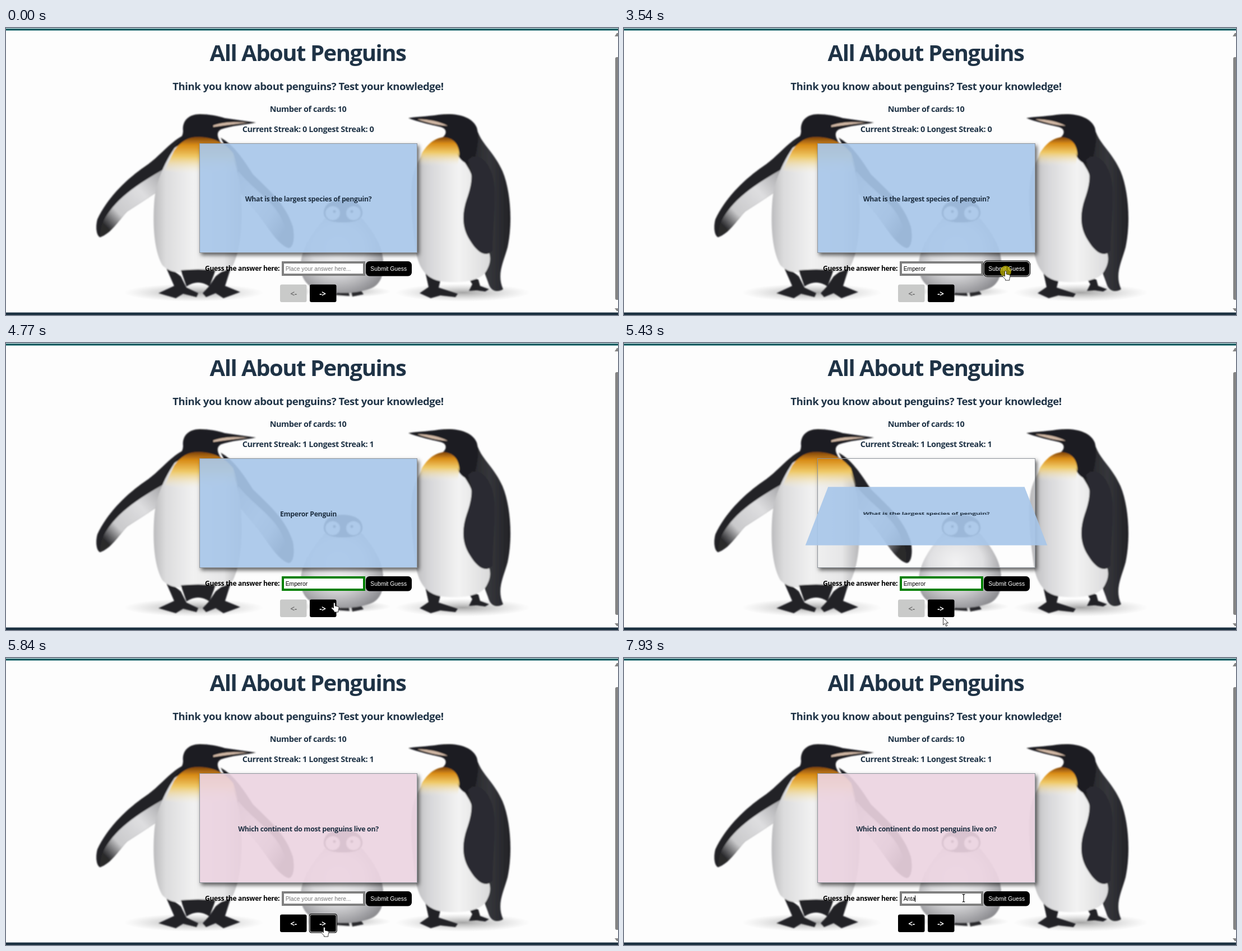
An HTML page for the animation above (8 s loop, 1092 by 513 pixels).

```html
<!DOCTYPE html>
<html lang="en">
<head>
<meta charset="utf-8">
<title>All About Penguins</title>
<style>
  html, body { margin: 0; width: 100%; height: 100%; overflow: hidden; background: #fdfdfd; }
  body { position: relative; }
  svg { position: absolute; left: 0; top: 0; width: 1092px; height: 513px; display: block; }
  .bold, .face {
    font-family: 'Open Sans', 'Noto Sans', sans-serif;
    font-weight: 700;
    letter-spacing: -0.025em;
    fill: #1f3346;
    color: #1f3042;
  }
  .title { letter-spacing: -0.037em; }
  .mid { text-anchor: middle; }
  .ctl { font: 10.3px 'Liberation Sans', Arial, sans-serif; }

  .card {
    position: absolute; left: 345px; top: 206px; width: 387px; height: 194px;
    border: 1px solid #8f959c;
    box-shadow: 3px 4px 7px rgba(0, 0, 0, .62);
    perspective: 790px;
  }
  .flip {
    position: absolute; inset: 0;
    transform-style: preserve-3d;
    animation: flip 8s infinite;
  }
  .face {
    position: absolute; inset: 0; padding-top: 2px; box-sizing: border-box;
    display: flex; align-items: center; justify-content: center;
    font-size: 12.3px; white-space: nowrap;
    background: rgba(168, 198, 233, .91);
    backface-visibility: hidden;
  }
  .back { transform: rotateX(180deg); }
  .pink .face { background: rgba(236, 211, 225, .91); }
  @keyframes flip {
    0%, 52.375% { transform: rotateX(0deg); animation-timing-function: ease; }
    57.375%, 65.9% { transform: rotateX(180deg); animation-timing-function: ease; }
    70.9%, 100% { transform: rotateX(0deg); }
  }
</style>
</head>
<body>

<svg viewBox="0 0 1092 513">
  <defs>
    <linearGradient id="belly">
      <stop offset="0" stop-color="#bcbcbe"/><stop offset=".14" stop-color="#dcdcdd"/>
      <stop offset=".45" stop-color="#f1f1f1"/><stop offset=".8" stop-color="#e6e6e7"/>
      <stop offset="1" stop-color="#b6b6b8"/>
    </linearGradient>
    <linearGradient id="bellySide">
      <stop offset="0" stop-color="#b8b8ba"/><stop offset=".25" stop-color="#d8d8da"/>
      <stop offset=".6" stop-color="#f3f3f3"/><stop offset="1" stop-color="#dadadb"/>
    </linearGradient>
    <linearGradient id="gold" x2="0" y2="1">
      <stop offset="0" stop-color="#7c420c"/><stop offset=".2" stop-color="#d98c18"/>
      <stop offset=".48" stop-color="#efc967"/><stop offset=".9" stop-color="#f6efdc" stop-opacity="0"/>
    </linearGradient>
    <linearGradient id="wingL" x1="1" y1="0" x2="0" y2="1">
      <stop offset="0" stop-color="#a2a2a5"/><stop offset=".35" stop-color="#dedee0"/>
      <stop offset=".68" stop-color="#c9c9cb"/><stop offset=".88" stop-color="#29292c"/>
    </linearGradient>
    <linearGradient id="wingR" x2="1" y2="1">
      <stop offset="0" stop-color="#8b8b8f"/><stop offset=".4" stop-color="#cfcfd1"/>
      <stop offset=".62" stop-color="#a8a8ab"/><stop offset=".85" stop-color="#29292c"/>
    </linearGradient>
    <linearGradient id="coat">
      <stop offset="0" stop-color="#1c1c1f"/><stop offset=".6" stop-color="#35363b"/>
      <stop offset="1" stop-color="#222226"/>
    </linearGradient>
    <radialGradient id="chick" cx=".45" cy=".4" r=".65">
      <stop offset="0" stop-color="#f3f3f4"/><stop offset=".5" stop-color="#e0e0e2"/>
      <stop offset="1" stop-color="#8f8f93"/>
    </radialGradient>
    <radialGradient id="ground">
      <stop offset="0" stop-color="#777" stop-opacity=".65"/><stop offset="1" stop-color="#aaa" stop-opacity="0"/>
    </radialGradient>
    <filter id="soft"><feGaussianBlur stdDeviation=".8"/></filter>
  </defs>

  <g fill="url(#ground)">
    <ellipse cx="335" cy="473" rx="125" ry="16"/>
    <ellipse cx="602" cy="471" rx="85" ry="11"/>
    <ellipse cx="815" cy="473" rx="120" ry="16"/>
  </g>

  <g filter="url(#soft)">
    <!-- left adult -->
    <path fill="#242428" d="M316 192C290 206 276 228 250 246C215 270 182 302 163 342C159 358 162 372 168 374C188 367 200 345 216 328L268 294L300 230Z"/>
    <path fill="url(#wingL)" d="M282 252C250 270 216 292 196 314C178 334 168 350 168 373C188 366 200 345 216 328L268 294Z"/>
    <path fill="#242428" d="M383 196C408 210 424 236 441 262C470 290 500 316 512 356C516 378 512 395 503 393C482 385 466 352 446 328L416 292L400 230Z"/>
    <path fill="url(#wingR)" d="M414 256C440 288 474 308 490 338C502 362 506 378 503 392C482 384 466 352 446 328L416 292Z"/>
    <path fill="#242428" d="M282 420L312 444L322 464L343 474L340 481L316 475L303 483L272 474L300 461ZM404 420L374 444L362 462L351 474L357 481L374 474L388 483L418 472L391 461Z"/>
    <path fill="url(#belly)" d="M308 204C292 226 270 262 265 305C261 350 264 398 279 424C294 440 320 440 343 432C364 440 390 440 405 424C419 396 423 345 419 296C416 256 404 222 382 202Z"/>
    <path fill="#242428" d="M312 433Q343 430 374 433L363 462Q343 448 322 462Z"/>
    <path fill="#1d1d20" d="M316 184C314 166 326 154 346 154C362 154 378 157 390 161L446 169C426 173 400 175 384 181C374 186 377 197 386 208C362 198 328 193 297 217C306 204 316 196 316 184Z"/>
    <path fill="url(#gold)" d="M300 219C314 199 330 193 350 195C372 197 390 205 405 224L414 254L352 268L284 254Z"/>
    <path fill="#d3b9a6" d="M370 174C390 167 412 168 432 169C410 171 390 174 370 177Z"/>

    <!-- right adult -->
    <path fill="#242428" d="M748 436L775 452L772 464L806 475L802 481L775 478L758 483L738 474L754 463ZM820 438L843 450L846 461L862 467L855 471L840 469L826 470L832 458Z"/>
    <path fill="url(#coat)" d="M806 190L842 186C850 208 872 224 886 256C901 292 904 350 895 392C888 418 875 440 887 467C875 474 864 470 860 454L840 400L815 300Z"/>
    <path fill="url(#bellySide)" d="M778 198C752 210 734 232 726 264C719 302 725 350 731 396C736 432 752 449 778 453C812 457 846 452 856 436C868 416 864 404 858 392C836 360 822 320 832 268C828 250 816 240 808 222Z"/>
    <path fill="#1d1d20" d="M718 161C736 158 756 158 772 155C804 151 832 158 840 178C844 192 843 208 835 240C824 246 812 240 806 226C802 212 794 204 776 198C788 190 787 180 776 177C758 173 736 168 718 161Z"/>
    <path fill="url(#gold)" d="M742 224C752 207 766 196 782 195C800 197 808 209 809 226L806 246L768 252L734 246Z"/>
    <path fill="#d3b9a6" d="M734 163C752 163 774 167 788 175C768 173 750 169 734 163Z"/>
    <path fill="#2b2c31" d="M832 230C856 226 872 256 872 296C872 330 868 372 868 398C856 412 840 400 828 380C812 356 814 330 822 306C832 278 834 258 824 236Z"/>

    <!-- chick -->
    <path fill="#2a2a2d" d="M594 468L611 470L613 479L588 477ZM616 470L632 467L638 476L618 480Z"/>
    <path fill="url(#chick)" d="M569 340C556 356 534 380 527 412C522 438 532 459 552 466C582 476 622 476 650 466C670 459 677 436 672 408C668 380 648 356 635 340Z"/>
    <path fill="#2a2a2d" d="M567 332C566 312 586 307 601 307C618 307 637 313 636 332C634 346 616 348 601 348C586 348 569 346 567 332Z"/>
    <g fill="#f1f1f2"><ellipse cx="583" cy="331" rx="12.5" ry="12"/><ellipse cx="620" cy="331" rx="12.5" ry="12"/></g>
    <g fill="#222"><circle cx="586" cy="328" r="3"/><circle cx="617" cy="328" r="3"/></g>
  </g>

  <rect y="1" width="1092" height="3.5" fill="#075c62"/>
  <rect y="508.5" width="1092" height="5" fill="#1b3040"/>
  <g fill="#858585">
    <rect x="1087" y="52" width="8" height="434" rx="3"/>
    <path d="M1086 15L1090 9H1092V15ZM1086 501H1092V506H1090Z"/>
  </g>
</svg>

<div class="card" id="card">
  <div class="flip">
    <div class="face" id="question">What is the largest species of penguin?</div>
    <div class="face back">Emperor Penguin</div>
  </div>
</div>

<svg viewBox="0 0 1092 513">
  <g class="bold mid">
    <text class="title" x="538.5" y="58.5" font-size="40">All About Penguins</text>
    <text x="539" y="111" font-size="18.5">Think you know about penguins? Test your knowledge!</text>
    <text x="539" y="149.5" font-size="14.4">Number of cards: 10</text>
    <text x="539" y="185.5" font-size="14.4" id="streak"></text>
  </g>
  <text class="bold" x="355" y="434" font-size="12" style="fill:#000">Guess the answer here:</text>

  <rect id="field" x="494" y="419" width="145" height="22" fill="#fff" stroke-width="4"/>
  <text class="ctl" id="typed" x="498.7" y="434"></text>
  <path id="caret" d="M.5 424.5V436" stroke="#000"/>

  <rect x="642" y="417" width="82" height="26.5" rx="6.5"/>
  <text class="ctl mid" x="682.7" y="434" fill="#fff">Submit Guess</text>
  <g id="submitRing" fill="none">
    <rect x="641.2" y="416.2" width="83.6" height="28.1" rx="7.2" stroke="#000" stroke-width="1.2"/>
    <rect x="642.3" y="417.3" width="81.4" height="25.9" rx="6.2" stroke="#fff" stroke-width=".8"/>
  </g>

  <rect id="prev" x="489" y="458.5" width="47.5" height="31.5" rx="3"/>
  <rect x="542" y="458.5" width="47.5" height="31.5" rx="3"/>
  <g id="nextRing" fill="none">
    <rect x="541.2" y="457.7" width="49.1" height="33.1" rx="3.6" stroke="#000" stroke-width="1.2"/>
    <rect x="542.3" y="458.8" width="46.9" height="30.9" rx="2.8" stroke="#fff" stroke-width=".8"/>
  </g>
  <g class="bold mid" font-size="13.5">
    <text id="prevText" x="513" y="479.5">&lt;-</text>
    <text x="565" y="479.5" style="fill:#fff">-&gt;</text>
  </g>

  <circle id="click" cx="681" cy="435" r="10" fill="#c9bd00" fill-opacity=".72"/>
  <g id="cursor" stroke-linejoin="round">
    <path id="arrow" fill="#fff" stroke="#222" stroke-width=".9" d="M.5 .5V13.5L3.5 10.8L5.6 15.8L7.8 14.9L5.7 10H9.6Z"/>
    <path id="hand" fill="#fff" stroke="#222" stroke-width=".9" d="M-1.5 10V1Q0 -1 1.3 1V6L7 7.2Q8.3 8 8 10L6.8 14.5V17H-.5V15L-5.4 10.2Q-5 7.8 -3 8.8Z"/>
    <path id="beam" fill="none" stroke="#000" stroke-width="1.1" d="M-2.5 -6.5H-1L0 -5.5L1 -6.5H2.5M0 -5.5V6M-2.5 7H-1L0 6L1 7H2.5"/>
  </g>
</svg>

<script>
const LOOP = 8000, SCORED = 3610, NEXT = 5840;
const $ = id => document.getElementById(id);
const show = (id, on) => $(id).setAttribute('visibility', on ? 'visible' : 'hidden');
const within = (t, from, to) => t >= from && t < to;
const setText = (id, text) => { if ($(id).textContent !== text) $(id).textContent = text; };

const firstKeys = [1480, 1670, 1880, 1940, 2080, 2140, 2280];
const secondKeys = [7250, 7590, 7780, 7930];
const caretSpans = [[890, 1410], [1480, 2870], [3370, 3480], [6780, LOOP]];

// time, x, y of the pointer tip
const path = [
  [120, 907, 508], [560, 690, 440], [700, 640, 424], [890, 608, 427], [3270, 608, 427],
  [3480, 681, 434], [3810, 681, 434], [4100, 614, 337], [4330, 614, 337],
  [4570, 590, 460], [4640, 590, 460], [4770, 586, 464], [4970, 586, 464],
  [5180, 580, 390], [5290, 580, 390], [5430, 569, 490.5], [5540, 569, 490.5],
  [5700, 568, 481], [5900, 568, 481], [6200, 600, 497], [6590, 704, 462],
  [6660, 704, 462], [6780, 606, 429], [LOOP, 606, 429]
];

// left, top, right, bottom
const fieldArea = [492, 417, 641, 443];
const linkAreas = [[345, 206, 733, 401], [642, 417, 724, 444], [542, 459, 589, 490]];
const hits = (x, y) => ([l, t, r, b]) => x >= l && x <= r && y >= t && y <= b;

function pointerAt(t) {
  const i = path.findIndex(p => p[0] > t);
  if (i < 1) return path[0].slice(1);
  const [t0, x0, y0] = path[i - 1], [t1, x1, y1] = path[i];
  const u = (t - t0) / (t1 - t0), k = u * u * (3 - 2 * u);
  return [x0 + (x1 - x0) * k, y0 + (y1 - y0) * k];
}

function drawPointer(t) {
  const [x, y] = pointerAt(t), hit = hits(x, y);
  const kind = hit(fieldArea) ? 'beam' : linkAreas.some(hit) ? 'hand' : 'arrow';
  $('cursor').setAttribute('transform', `translate(${x} ${y})`);
  for (const id of ['arrow', 'hand', 'beam']) show(id, t >= 120 && id === kind);
}

function drawField(t) {
  const [word, keys] = t < NEXT ? ['Emperor', firstKeys] : ['Anta', secondKeys];
  const value = word.slice(0, keys.filter(k => k <= t).length);
  setText('typed', value || 'Place your answer here...');
  $('typed').setAttribute('fill', value ? '#000' : '#767676');
  $('field').setAttribute('stroke', within(t, SCORED, NEXT) ? '#008000' : '#808080');
  const width = value ? $('typed').getComputedTextLength() : 0;
  $('caret').setAttribute('transform', `translate(${Math.round(498.7 + width - .5)} 0)`);
  show('caret', caretSpans.some(([a, b]) => within(t, a, b)));
}

function draw(t) {
  const second = t >= NEXT, n = t >= SCORED ? 1 : 0;
  setText('streak', `Current Streak: ${n} Longest Streak: ${n}`);
  setText('question', second ? 'Which continent do most penguins live on?' : 'What is the largest species of penguin?');
  $('card').classList.toggle('pink', second);
  $('prev').setAttribute('fill', second ? '#000' : '#c9cac9');
  $('prevText').style.fill = second ? '#fff' : '#777';
  show('submitRing', within(t, 3480, 4190));
  show('nextRing', within(t, NEXT, 6590));
  show('click', within(t, 3480, SCORED));
  drawField(t);
  drawPointer(t);
}

let start;
function tick(now) {
  start ??= now;
  draw((now - start) % LOOP);
  requestAnimationFrame(tick);
}
draw(0);
requestAnimationFrame(tick);
</script>
</body>
</html>
```
